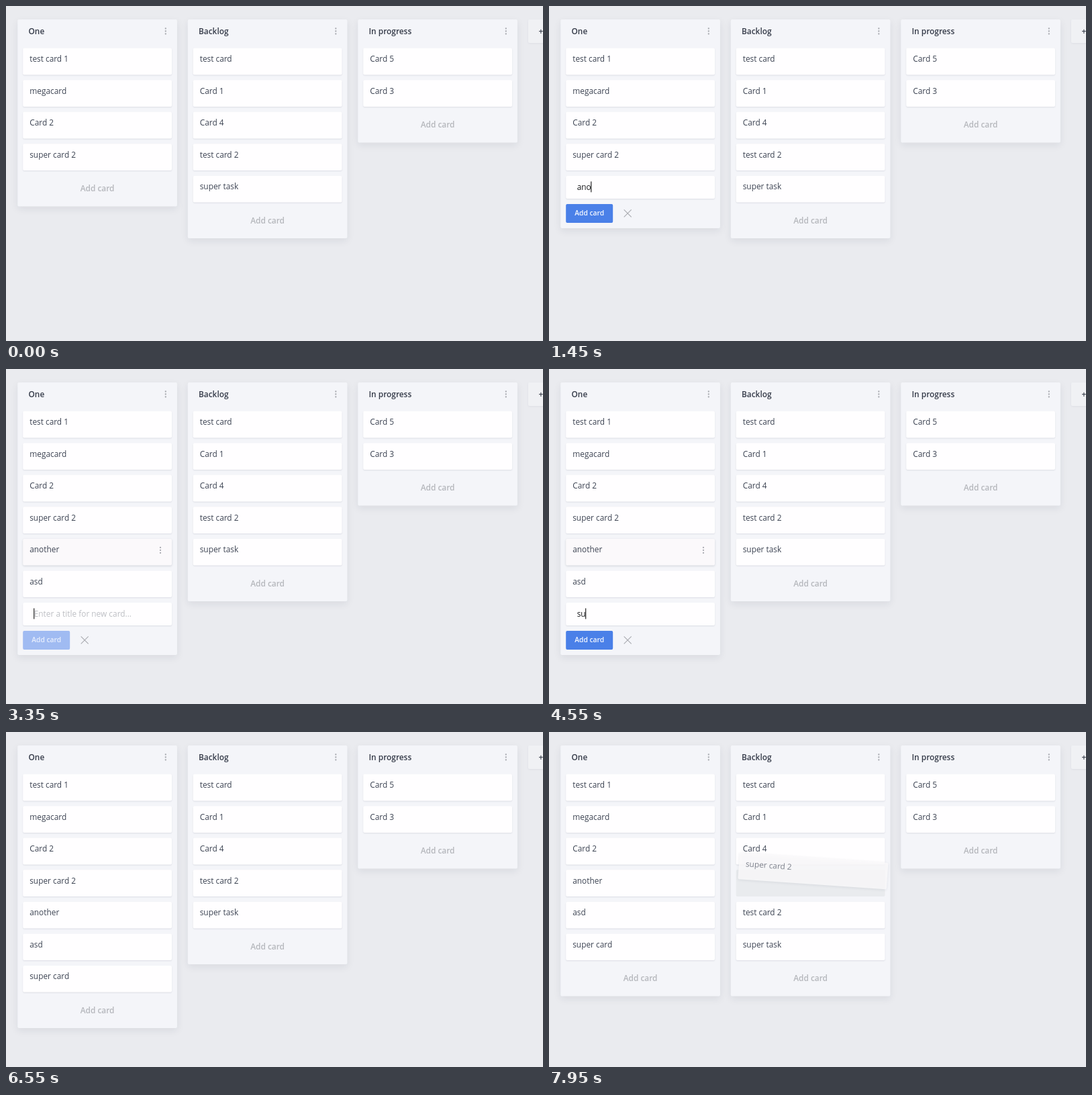
These frames come from a looping animation (800x499 px, 8000 ms). An HTML page with a canvas:

```html
<!DOCTYPE html>
<html lang="en">
<head>
<meta charset="utf-8">
<title>Task board</title>
<style>
html, body { margin: 0; width: 100%; height: 100%; overflow: hidden; background: #eaebef; }
canvas { display: block; width: 800px; height: 499px; }
</style>
</head>
<body>
<canvas id="stage"></canvas>
<script>
const W = 800, H = 499, LOOP = 8000, TICK = 50;
const CARD_W = 221.8, CARD_H = 39.6, PITCH = 47.52, TOP = 62.8;
const LIST_X = 17.3, LIST_Y = 20, LIST_W = 237.6, LIST_PITCH = 253.5;
const FONT = '"Open Sans", sans-serif';
const REGULAR = `11.88px ${FONT}`, BOLD = `600 11.88px ${FONT}`, SMALL = `600 10.3px ${FONT}`;
const INK = '#3d4453', MUTED = '#b5b7bc';

const canvas = document.getElementById('stage');
const ctx = canvas.getContext('2d');
const dpr = window.devicePixelRatio || 1;
canvas.width = Math.round(W * dpr);
canvas.height = Math.round(H * dpr);

const clamp = v => Math.max(0, Math.min(1, v));
const ramp = (t, from, to) => clamp((t - from) / (to - from));
const within = (t, from, to) => t >= from && t < to;
const rowY = i => TOP + i * PITCH;

function text(str, x, y, font, color, align = 'left') {
  ctx.font = font;
  ctx.fillStyle = color;
  ctx.textAlign = align;
  ctx.fillText(str, x, y);
}

function box(x, y, w, h, fill, shadow) {
  ctx.save();
  if (shadow) {
    ctx.shadowColor = `rgba(30,40,60,${shadow.alpha})`;
    ctx.shadowOffsetY = shadow.y * dpr;
    ctx.shadowBlur = shadow.blur * dpr;
  }
  ctx.fillStyle = fill;
  ctx.beginPath();
  ctx.roundRect(x, y, w, h, 2);
  ctx.fill();
  ctx.restore();
}

function dots(x, y) {
  ctx.fillStyle = '#a9abb1';
  for (const dy of [-4, 0, 4]) {
    ctx.beginPath();
    ctx.arc(x, y + dy, 1.15, 0, Math.PI * 2);
    ctx.fill();
  }
}

function card(title, x, y, hovered) {
  box(x, y, CARD_W, CARD_H, hovered ? '#fbf9fb' : '#fffeff',
    { y: 1, blur: hovered ? 3 : 2, alpha: hovered ? 0.17 : 0.11 });
  text(title, x + 10, y + 20.3, REGULAR, INK);
  if (hovered) dots(x + 204.8, y + 17);
}

function form(x, y, { value, caret }) {
  box(x, y, CARD_W, 34, '#fffeff', { y: 1, blur: 2, alpha: 0.11 });
  const textX = x + 16.5;
  text(value || 'Enter a title for new card...', textX, y + 21.2, REGULAR, value ? '#17181b' : '#bdbfc4');
  if (caret) {
    ctx.fillStyle = '#111';
    ctx.fillRect(textX - 0.5 + (value ? ctx.measureText(value).width : 0), y + 8.5, 1.1, 16);
  }
  box(x, y + 42, 70, 28, value ? '#4a80e8' : '#a0bbf2');
  text('Add card', x + 35, y + 59.4, SMALL, value ? '#f4f7ff' : '#e8effd', 'center');

  ctx.strokeStyle = '#a9abb0';
  ctx.lineWidth = 1.1;
  ctx.beginPath();
  for (const s of [-1, 1]) {
    ctx.moveTo(x + 92 - 5.5, y + 56 - 5.5 * s);
    ctx.lineTo(x + 92 + 5.5, y + 56 + 5.5 * s);
  }
  ctx.stroke();
}

// A null card marks the empty slot of the dragged card.
function list(index, { title, cards, hover, entry, footer = 0 }) {
  const x = LIST_X + index * LIST_PITCH, cardX = x + 7.9;
  const end = rowY(cards.length);
  const bottom = end + (entry ? 78.2 : 45.6);
  box(x, LIST_Y, LIST_W, bottom - LIST_Y, '#f4f5f9', { y: 4, blur: 12, alpha: 0.08 });
  text(title, x + 16.2, 42, BOLD, '#353b49');
  dots(x + 220.5, 37.5);
  cards.forEach((name, i) => {
    if (name === null) box(cardX, rowY(i), CARD_W, CARD_H, '#e9ebee');
    else card(name, cardX, rowY(i), name === hover);
  });
  if (entry) {
    form(cardX, end, entry);
  } else {
    const shade = ch => Math.round(ch - 58 * footer);
    text('Add card', x + LIST_W / 2, end + 23.5, BOLD,
      `rgb(${shade(181)},${shade(183)},${shade(188)})`, 'center');
  }
}

// Each session: opens, key times, submitted, caret blinks off.
const sessions = [
  { word: 'another', open: 600, keys: [1150, 1300, 1450, 1600, 1650, 1800, 1850], done: 2050, blink: 1150 },
  { word: 'asd', open: 2050, keys: [2850, 3000, 3150], done: 3350, blink: 2600 },
  { word: 'super card', open: 3350, keys: Array.from({ length: 10 }, (_, i) => 4350 + i * 144.4), done: 5750, blink: 3800 },
  { word: '', open: 5750, keys: [], done: 6550, blink: 6250 }
];

function entryAt(t) {
  const s = sessions.find(s => within(t, s.open, s.done));
  if (!s) return null;
  const typed = s.keys.filter(k => t >= k).length;
  return { value: s.word.slice(0, typed), caret: t >= 650 && (typed > 0 || t < s.blink) };
}

const dragPath = [
  [7350, 136, 225], [7450, 215, 228], [7550, 327.5, 225.5],
  [7650, 364, 220], [7800, 384, 211], [7950, 393.4, 207]
];

function dragPoint(t) {
  let i = 0;
  while (i < dragPath.length - 2 && t >= dragPath[i + 1][0]) i++;
  const [t0, x0, y0] = dragPath[i], [t1, x1, y1] = dragPath[i + 1];
  const k = ramp(t, t0, t1);
  return [x0 + (x1 - x0) * k, y0 + (y1 - y0) * k];
}

function ghost(t) {
  const [x, y] = dragPoint(t);
  ctx.save();
  ctx.translate(x, y);
  ctx.rotate(4 * Math.PI / 180 * ramp(t, 7300, 7450));
  ctx.globalAlpha = 0.82;
  box(-CARD_W / 2, -CARD_H / 2, CARD_W, CARD_H, '#fcfafc', { y: 1, blur: 4, alpha: 0.1 });
  ctx.globalAlpha = 0.85 - 0.2 * ramp(t, 7550, 7950);
  text('super card 2', -CARD_W / 2 + 10, -CARD_H / 2 + 20.3, REGULAR, INK);
  ctx.restore();
}

function draw(t) {
  ctx.setTransform(dpr, 0, 0, dpr, 0, 0);
  ctx.fillStyle = '#eaebef';
  ctx.fillRect(0, 0, W, H);

  const dragging = t >= 7350, moved = t >= 7700;
  const added = sessions.filter(s => s.word && t >= s.done).map(s => s.word);
  const own = moved ? [] : [dragging ? null : 'super card 2'];
  const slot = moved ? [null] : [];

  let hover = '';
  if (within(t, 2050, 6050) || within(t, 6750, 6950)) hover = 'another';
  else if (within(t, 7000, 7350)) hover = 'super card 2';

  list(0, {
    title: 'One',
    cards: ['test card 1', 'megacard', 'Card 2', ...own, ...added],
    hover, entry: entryAt(t),
    footer: t < 600 ? ramp(t, 200, 450) : 0
  });
  list(1, {
    title: 'Backlog',
    cards: ['test card', 'Card 1', 'Card 4', ...slot, 'test card 2', 'super task'],
    hover: within(t, 7500, 7700) ? 'test card 2' : '',
    footer: within(t, 6300, 6400) ? 0.25 : 0
  });
  list(2, { title: 'In progress', cards: ['Card 5', 'Card 3'] });

  box(LIST_X + 3 * LIST_PITCH, LIST_Y, LIST_W, 35, '#f0f1f4', { y: 1, blur: 3, alpha: 0.06 });
  text('+ Add list', 793.4, 42, BOLD, '#353b49');

  if (dragging) ghost(t);
}

const start = performance.now();
function frame() {
  const t = (performance.now() - start) % LOOP;
  draw(Math.floor(t / TICK) * TICK);
  requestAnimationFrame(frame);
}
frame();
</script>
</body>
</html>
```
